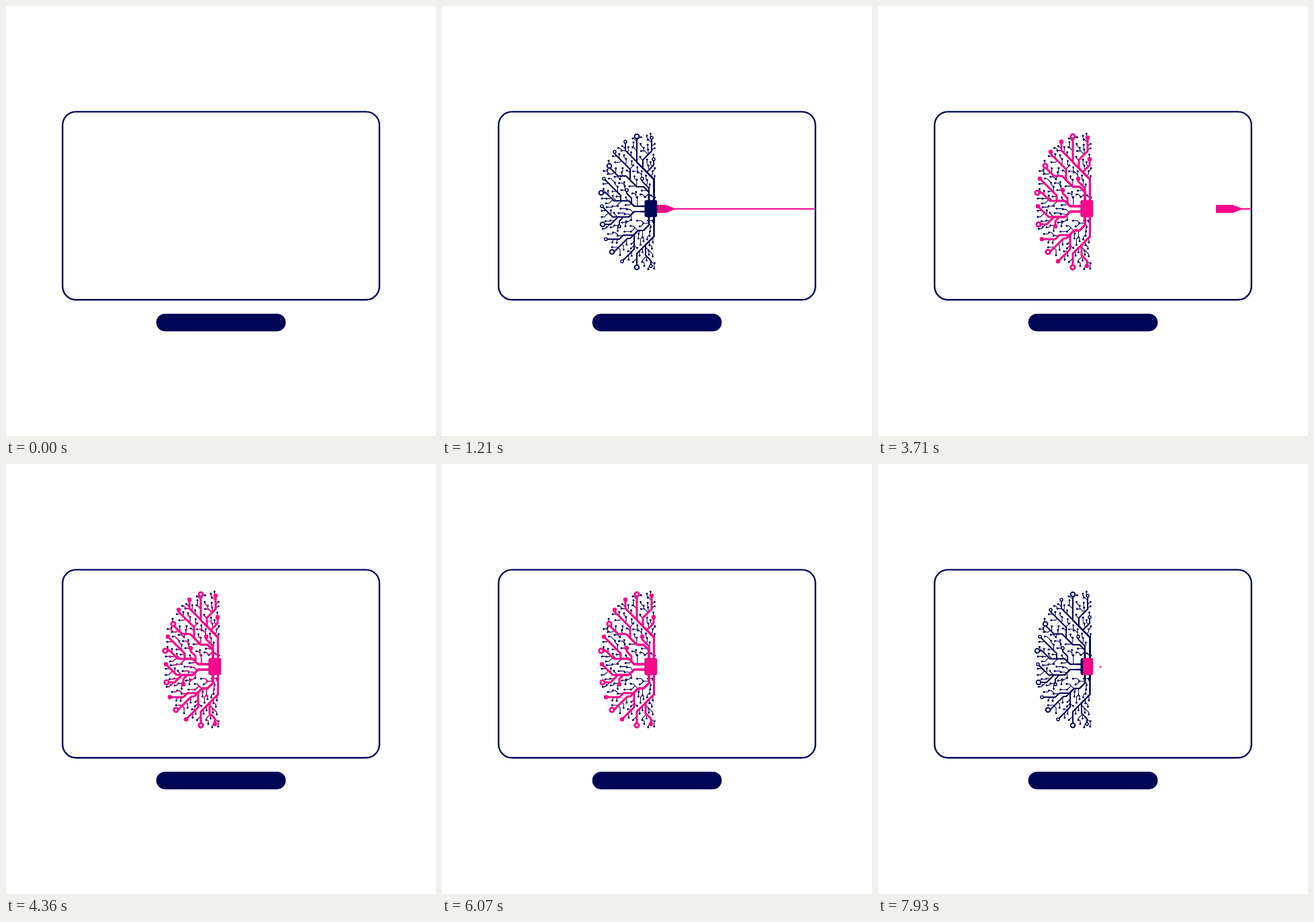
These frames come from a looping animation (640 by 640 pixels, 8000 ms). An HTML page:

```html
<!DOCTYPE html>
<html lang="en">
<head>
<meta charset="utf-8">
<title>Circuit brain</title>
<style>
  html, body { margin: 0; width: 100%; height: 100%; overflow: hidden; background: #fff; }
  svg { display: block; width: 100%; height: 100%; }
  path { fill: none; stroke-linejoin: round; }
  #cable path { fill: #f50a8c; }
</style>
</head>
<body>
<svg viewBox="0 0 640 640">
  <defs><clipPath id="screen"><rect x="86" y="159" width="468.3" height="277"/></clipPath></defs>
  <rect x="84.2" y="157.4" width="471.6" height="279.8" rx="20" fill="#fff" stroke="#000556" stroke-width="2.4"/>
  <rect x="223.6" y="458" width="192.8" height="26.2" rx="13.1" fill="#000556"/>
  <g clip-path="url(#screen)">
    <g id="cable">
      <path d="M308 296H333L346 301H900V303H346L333 308H308Z"/>
    </g>
  </g>
  <g id="brain">
    <g id="navyTwigs"></g>
    <g id="navyTrunks"></g>
    <path d="M308 280V323M315.5 280V321M295 298H303M295 306H303" stroke="#000556" stroke-width="2.6"/>
    <rect x="301.5" y="288.7" width="18.7" height="25.6" rx="3" fill="#000556"/>
  </g>
  <g id="pinkTwigs"></g>
  <g id="pinkTrunks"></g>
  <rect id="chip" x="301.5" y="288.7" width="18.7" height="25.6" rx="3" fill="#f50a8c"/>
  <circle id="spark" cx="331" cy="302" r="1.4" fill="#f50a8c"/>
</svg>
<script>
const NAVY = '#000556', PINK = '#f50a8c', LOOP = 8000;
const $ = id => document.getElementById(id);

const joint = (x, y, ...next) => ({ x, y, next });
const ring = (x, y) => ({ x, y });
const bigRing = (x, y) => ({ x, y, big: true });

// Six wires leave the chip and fork until they end in rings.
const wires = [
  joint(315.5, 289, joint(315.5, 258,
    bigRing(290, 194),
    joint(290, 232, ring(273, 202)),
    joint(299, 229, ring(312, 196)),
    joint(305, 247, ring(315, 228)))),
  joint(308, 289, joint(308, 277,
    joint(290, 269,
      joint(262, 253, bigRing(249, 238)),
      joint(280, 243, ring(257, 217))),
    joint(308, 271, ring(298, 257)))),
  joint(302, 298, joint(286, 298,
    joint(266, 290,
      joint(256, 290, bigRing(237, 278)),
      joint(266, 282, ring(241, 257))),
    joint(282, 286, ring(275, 274)))),
  joint(302, 306, joint(286, 306,
    joint(270, 314,
      joint(262, 314, bigRing(239, 325)),
      joint(254, 314, ring(238, 298)),
      ring(264, 328)))),
  joint(308, 314, joint(308, 326,
    joint(292, 334,
      joint(276, 346, bigRing(253, 366)),
      joint(270, 341, ring(244, 347)),
      joint(286, 362, ring(268, 380))))),
  joint(315.5, 314, joint(315.5, 343,
    bigRing(290, 389),
    joint(303, 371, ring(311, 387))))
];

const clamp = x => Math.min(1, Math.max(0, x));
const span = (t, from, to) => clamp((t - from) / (to - from));
const inOut = u => u < .5 ? 4 * u ** 3 : 1 - 4 * (1 - u) ** 3;

let seed = 7;
const random = () => (seed = seed * 16807 % 2147483647) / 2147483647;

function add(parent, tag, attributes) {
  const node = document.createElementNS('http://www.w3.org/2000/svg', tag);
  for (const key in attributes) node.setAttribute(key, attributes[key]);
  return parent.appendChild(node);
}

const addLine = (group, d, color, width) =>
  add($(group), 'path', { d, stroke: color, 'stroke-width': width, pathLength: 1 });
const addDot = (group, { x, y }, r, fill, stroke = 'none', width = 0) =>
  add($(group), 'circle', { cx: x, cy: y, r, fill, stroke, 'stroke-width': width });

// Every leg runs at 45° first, then straight.
function leg(from, to) {
  const dx = to.x - from.x, dy = to.y - from.y;
  const run = Math.min(Math.abs(dx), Math.abs(dy));
  return `L${from.x + Math.sign(dx) * run} ${from.y + Math.sign(dy) * run}L${to.x} ${to.y}`;
}

const growing = { trunks: [], twigs: [] };
const samples = [], rings = [];

function sample(path, from) {
  const length = path.getTotalLength();
  for (let s = from; s < length; s += 2) samples.push(path.getPointAtLength(s));
}

function addWire(node, d) {
  if (node.next) return node.next.forEach(next => addWire(next, d + leg(node, next)));
  sample(addLine('navyTrunks', d, NAVY, 2.1), 10);
  rings.push({ node, line: addLine('pinkTrunks', d, PINK, 3.1) });
}

function addRing({ node, line }) {
  const { big } = node;
  addDot('navyTrunks', node, big ? 3.3 : 2.1, '#fff', NAVY, big ? 2 : 1.5);
  const dot = addDot('pinkTrunks', node, big ? 3.1 : 2.3, big ? '#fff' : PINK, PINK, big ? 2.8 : 2);
  growing.trunks.push({ line, dot });
}

const distance = (a, b) => Math.hypot(a.x - b.x, a.y - b.y);
const nearest = (p, points) => points.reduce((a, b) => distance(b, p) < distance(a, p) ? b : a);

// A twig leaves the closest wire on the side facing the chip.
function addTwig(tip) {
  const pull = 5 / distance(tip, { x: 312, y: 302 });
  const foot = nearest({ x: tip.x + (312 - tip.x) * pull, y: tip.y + (302 - tip.y) * pull }, samples);
  if (distance(foot, tip) > 15) return false;
  const d = `M${foot.x} ${foot.y}` + leg(foot, tip);
  const navy = addLine('navyTwigs', d, NAVY, 1.1);
  addDot('navyTwigs', tip, 1.5, NAVY);
  growing.twigs.push({
    line: addLine('pinkTwigs', d, PINK, 1.8),
    dot: addDot('pinkTwigs', tip, 1.7, PINK)
  });
  sample(navy, 2);
  return true;
}

// Scatter twig tips over the half oval, clear of wires and of each other.
function addTwigs() {
  const tips = rings.map(({ node }) => node);
  for (let i = 0; i < 5000; i++) {
    const tip = { x: 234 + 83 * random(), y: 190 + 202 * random() };
    const inOval = (Math.abs(tip.x - 317) / 83) ** 2.2 + (Math.abs(tip.y - 291) / 102) ** 2.2 < 1;
    const nearChip = tip.x > 284 && Math.abs(tip.y - 302) < 17;
    if (!inOval || nearChip) continue;
    if (distance(nearest(tip, samples), tip) < 4 || distance(nearest(tip, tips), tip) < 5.8) continue;
    if (addTwig(tip)) tips.push(tip);
  }
}

wires.forEach(wire => addWire(wire, `M${wire.x} ${wire.y}`));
rings.forEach(addRing);
addTwigs();

function grow(parts, amount) {
  for (const { line, dot } of parts) {
    line.style.visibility = amount > 0 ? 'visible' : 'hidden';
    line.setAttribute('stroke-dasharray', `${amount} 2`);
    dot.style.opacity = span(amount, .93, .99);
  }
}

function draw(t) {
  $('brain').style.opacity = span(t, 20, 800);

  const arrive = 1 - (1 - span(t, 860, 1180)) ** 2;
  const offset = 250 * (1 - arrive + span(t, 3477, 3777));
  $('cable').setAttribute('transform', `translate(${offset} 0)`);

  const empty = 25.6 * (1 - span(t, 1250, 1905));
  const drained = Math.max(0, t - 7800) * .027;
  $('chip').style.visibility = t > 1250 ? 'visible' : 'hidden';
  $('chip').style.clipPath = `inset(${empty}px 0 0 ${drained}px)`;
  $('spark').style.visibility = t > 7900 ? 'visible' : 'hidden';

  grow(growing.trunks, t < 5000 ? inOut(span(t, 2100, 3430)) : (1 - span(t, 6220, 7500)) ** 2.8);
  grow(growing.twigs, t < 5000 ? inOut(span(t, 3720, 4930)) : 1 - inOut(span(t, 5430, 6210)));
}

const begin = performance.now();
function frame() {
  draw((performance.now() - begin) % LOOP);
  requestAnimationFrame(frame);
}
frame();
</script>
</body>
</html>
```
